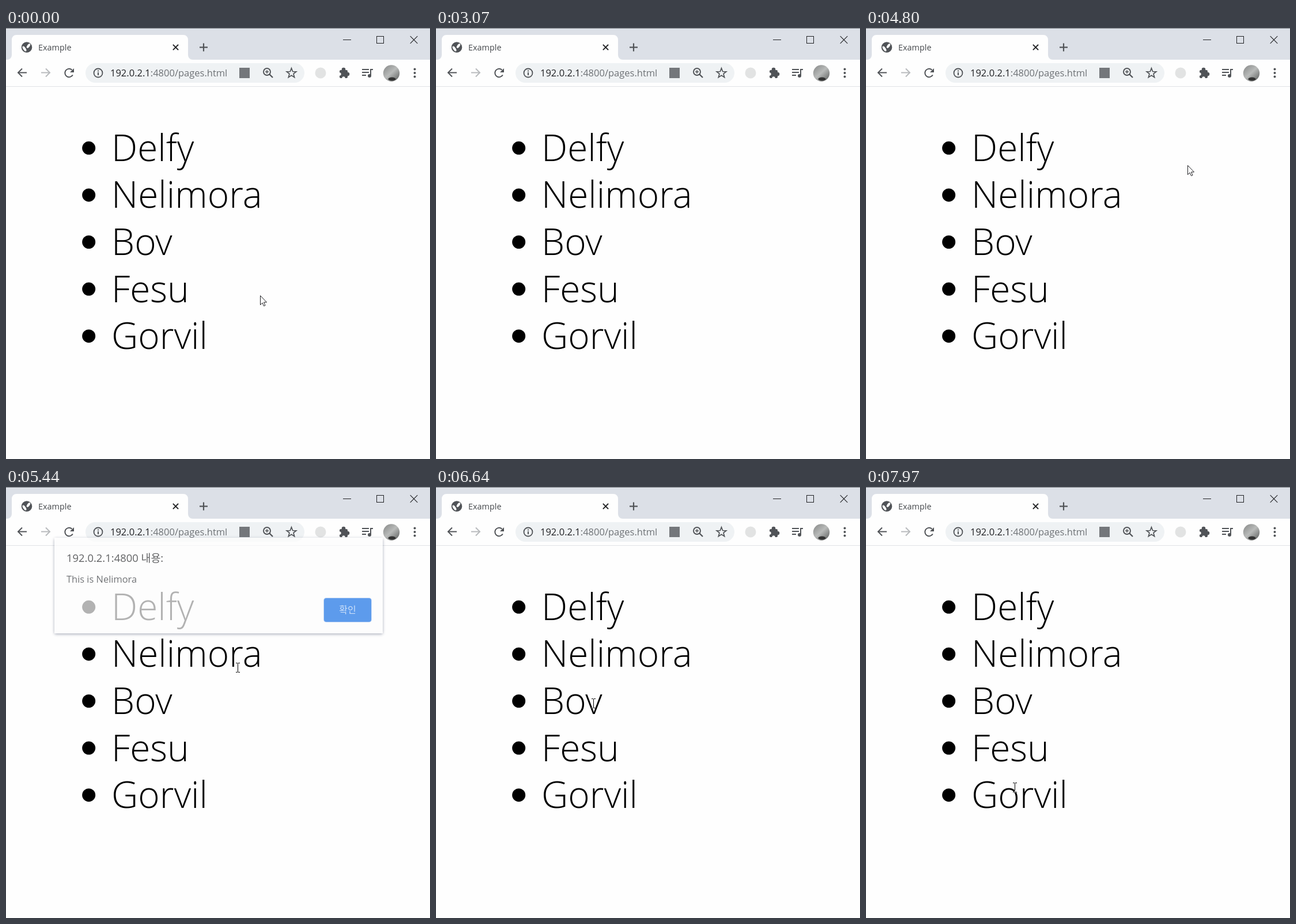
Write an HTML page with a canvas that moves like this. It is 736 by 748 pixels and loops after 8 s.

```html
<!DOCTYPE html>
<html lang="ko">
<head>
<meta charset="utf-8">
<title>Example</title>
<style>
html, body { margin: 0; width: 100%; height: 100%; overflow: hidden; background: #fefefe; }
canvas { display: block; }
</style>
</head>
<body>
<canvas id="stage" width="736" height="748"></canvas>
<script>
const ctx = document.getElementById('stage').getContext('2d');
const LOOP = 8000, FADE = 150, TAU = Math.PI * 2;
const FONT = '"Open Sans", "Noto Sans CJK KR", "Noto Sans CJK", "Noto Sans", sans-serif';
const PAGE = '#fefefe', STRIP = '#dce0e7', PILL = '#eff2f4', INK = '#505357', DARK = '#202124';
const NAMES = ['Delfy', 'Nelimora', 'Bov', 'Fesu', 'Gorvil'];
const HOST = '192.0.2.1', PORT = ':4800';
const LIST = { x: 183, base: 230.8, step: 81.6, font: `350 64px ${FONT}` };
const PANEL = { x: 84, y: 97, w: 570, h: 166 };

// Clicks on list items; each alert is closed with its button before the next click
const CLICKS = [
  { t: 3800, item: 0, x: 216, y: 220 },
  { t: 5335, item: 1, x: 402, y: 313 },
  { t: 6675, item: 2, x: 273, y: 375 },
  { t: 8000, item: 4, x: 258, y: 521 }
];
const BUTTON = { x: 592, y: 222 };
const START = { x: 441, y: 464 }, EXIT = { x: 425, y: 760 }, ENTRY = { x: 745, y: 330 };
// Fractions of the time between two clicks
const LEAVE = .18, REACH = .48, CLOSE = .52, RETURN = .56, ARRIVE = .9;

const clamp = v => Math.max(0, Math.min(1, v));

function move(a, b, t, from, to) {
  const v = clamp((t - from) / (to - from)), k = v * v * (3 - 2 * v);
  return { x: a.x + (b.x - a.x) * k, y: a.y + (b.y - a.y) * k };
}

function box(x, y, w, h, color, r = 0) {
  ctx.fillStyle = color;
  ctx.beginPath();
  ctx.roundRect(x, y, w, h, r);
  ctx.fill();
}

function oval(x, y, rx, ry, color, turn = 0) {
  ctx.fillStyle = color;
  ctx.beginPath();
  ctx.ellipse(x, y, rx, ry, turn, 0, TAU);
  ctx.fill();
}

const dot = (x, y, r, color = INK) => oval(x, y, r, r, color);

function ring(x, y, r, width = 2, from = 0, to = TAU) {
  ctx.strokeStyle = INK;
  ctx.lineWidth = width;
  ctx.beginPath();
  ctx.arc(x, y, r, from, to);
  ctx.stroke();
}

function trace(points, close) {
  ctx.beginPath();
  points.forEach(([x, y]) => ctx.lineTo(x, y));
  if (close) ctx.closePath();
}

function line(points, width = 2, color = INK, close = false) {
  ctx.strokeStyle = color;
  ctx.lineWidth = width;
  trace(points, close);
  ctx.stroke();
}

function shape(points, color = INK) {
  ctx.fillStyle = color;
  trace(points, true);
  ctx.fill();
}

function cross(x, y, r, width) {
  line([[x - r, y - r], [x + r, y + r]], width, DARK);
  line([[x + r, y - r], [x - r, y + r]], width, DARK);
}

function plus(x, y, r, width) {
  line([[x - r, y], [x + r, y]], width);
  line([[x, y - r], [x, y + r]], width);
}

function text(str, x, y, size, color, align = 'left') {
  ctx.font = `${size}px ${FONT}`;
  ctx.fillStyle = color;
  ctx.textAlign = align;
  ctx.fillText(str, x, y);
  return ctx.measureText(str).width;
}

function arrow(x, y, dir, color) {
  line([[x - 8 * dir, y], [x + 7 * dir, y]], 2, color);
  line([[x, y - 7], [x + 7 * dir, y], [x, y + 7]], 2, color);
}

function drawTab(left, right, top, bottom, r) {
  ctx.fillStyle = PAGE;
  ctx.beginPath();
  ctx.moveTo(left - r, bottom);
  ctx.arcTo(left, bottom, left, top, r);
  ctx.arcTo(left, top, right, top, r);
  ctx.arcTo(right, top, right, bottom, r);
  ctx.arcTo(right, bottom, right + r, bottom, r);
  ctx.lineTo(right + r, bottom);
  ctx.fill();
}

function drawTabStrip() {
  box(0, 0, 736, 55, STRIP);
  box(0, 0, 736, 1, '#7a7d82');
  drawTab(10, 316, 12, 55, 8);
  dot(36, 33.5, 9.3);
  oval(32, 36, 2.2, 5, PAGE, -.6);
  oval(39, 31, 2.2, 4.5, PAGE, .6);
  text('Example', 56, 38.8, 14.4, '#45484c');
  cross(294.5, 33.5, 4.6, 2);
  plus(343, 33.5, 7, 2.2);
  line([[585, 20.5], [599, 20.5]], 1, DARK);
  ctx.strokeRect(643.5, 14.5, 12, 12);
  cross(708, 20.5, 6.3, 1.1);
}

function drawStar(x, y) {
  const points = Array.from({ length: 10 }, (_, i) => {
    const r = i % 2 ? 3.7 : 8.8, a = i * TAU / 10 - TAU / 4;
    return [x + r * Math.cos(a), y + r * Math.sin(a)];
  });
  line(points, 1.7, INK, true);
}

function drawPuzzle(x, y) {
  box(x - 7, y - 5, 14, 14, INK, 2);
  dot(x, y - 6, 3.3);
  dot(x + 7, y + 2, 3.3);
  dot(x - 7, y + 2, 2.7, PAGE);
  dot(x, y + 9, 2.7, PAGE);
}

function drawQueue(x, y) {
  for (let i = 0; i < 3; i++) {
    line([[x, y + 5 * i], [x + (i < 2 ? 12 : 7), y + 5 * i]]);
  }
  line([[x + 19, y], [x + 15, y], [x + 15, y + 11]]);
  dot(x + 13, y + 11, 3);
}

function drawAvatar(x, y) {
  const g = ctx.createLinearGradient(x - 12, y - 12, x + 10, y + 12);
  g.addColorStop(0, '#8d8f8e');
  g.addColorStop(.5, '#b9bbba');
  g.addColorStop(1, '#6d6f6e');
  dot(x, y, 14.2, g);
  oval(x + 1, y + 10, 6.5, 3, '#333');
}

function drawToolbar() {
  box(0, 55, 736, 46, PAGE);
  box(0, 101, 736, 1, '#e1e3e6');
  arrow(28, 77.5, -1, INK);
  arrow(69, 77.5, 1, '#b8babd');
  ring(109.5, 78, 7.2, 2, .5, TAU * .875);
  shape([[118, 70], [118, 77], [111, 77]]);

  box(138, 61, 380, 34, PILL, 17);
  ring(160, 78, 7.5, 1.8);
  box(159, 77, 2, 5, INK);
  box(159, 73.5, 2, 2, INK);
  const w = text(HOST, 181, 84, 16.5, DARK);
  text(PORT + '/pages.html', 181 + w, 84, 16.5, '#6d7175');

  box(405, 69, 18, 18, '#74777b');
  ring(453, 76, 6, 1.9);
  plus(453, 76, 3, 1.5);
  line([[457.5, 80.5], [463, 86]], 2.3);
  drawStar(495.5, 78.5);
  dot(546, 78, 9.5, '#e2e3e3');
  drawPuzzle(586, 78);
  drawQueue(618, 72);
  drawAvatar(669, 78.5);
  for (let i = -1; i < 2; i++) dot(709.5, 78 + 6.5 * i, 2);
}

function drawList() {
  NAMES.forEach((name, i) => {
    dot(143.7, 208.3 + i * LIST.step, 11.5, '#000');
    ctx.font = LIST.font;
    ctx.textAlign = 'left';
    ctx.fillText(name, LIST.x, LIST.base + i * LIST.step);
  });
}

function sceneAt(t) {
  const i = CLICKS.findLastIndex(c => c.t <= t);
  if (i < 0) {
    const pointer = t < 1500
      ? move(START, EXIT, t, 120, 720)
      : move(ENTRY, CLICKS[0], t, 3180, 3720);
    return { pointer, show: 0 };
  }
  const click = CLICKS[i], next = CLICKS[i + 1];
  const gap = next.t - click.t, u = (t - click.t) / gap;
  const pointer = u < RETURN
    ? move(click, BUTTON, u, LEAVE, REACH)
    : move(BUTTON, next, u, RETURN, ARRIVE);
  const show = Math.min(clamp(u * gap / FADE), 1 - clamp((u - CLOSE) * gap / FADE));
  return { pointer, show, item: click.item };
}

function drawPanelShadow({ x, y, w, h }) {
  ctx.save();
  ctx.beginPath();
  ctx.rect(0, -50, 736, 848);
  ctx.rect(x, y, w, h);
  ctx.clip('evenodd');
  ctx.shadowColor = 'rgba(50, 60, 90, .6)';
  ctx.shadowBlur = 5;
  ctx.shadowOffsetY = 1.5;
  box(x, y, w, h, '#d5d9e2', 3);
  ctx.restore();
}

function drawAlert(item, show) {
  ctx.save();
  ctx.globalAlpha = show;
  ctx.translate(0, -30 * (1 - show));
  drawPanelShadow(PANEL);
  box(PANEL.x, PANEL.y, PANEL.w, PANEL.h, PAGE, 3);
  text(`${HOST}${PORT} 내용:`, 105, 139, 18.4, DARK);
  text('This is ' + NAMES[item], 105, 175.3, 16.4, '#36393d');
  box(551, 201, 84, 43, '#b5cff5', 5);
  box(552, 202, 82, 41, '#3080e8', 4);
  text('확인', 593, 227.5, 16, '#fff', 'center');
  ctx.restore();
}

function overPanel(x, y) {
  return x > PANEL.x && x < PANEL.x + PANEL.w && y > PANEL.y && y < PANEL.y + PANEL.h;
}

function overText(x, y) {
  const name = NAMES[Math.floor((y - 167) / LIST.step)];
  if (!name) return false;
  ctx.font = LIST.font;
  return x > LIST.x && x < LIST.x + ctx.measureText(name).width;
}

function drawPointer({ x, y }, show) {
  const beam = overText(x, y) && !(show && overPanel(x, y));
  ctx.save();
  ctx.translate(Math.round(x), Math.round(y));
  if (beam) {
    ctx.globalCompositeOperation = 'difference';
    box(0, -7, 1, 15, '#fff');
    for (const side of [-3, 1]) {
      box(side, -8, 3, 1, '#fff');
      box(side, 8, 3, 1, '#fff');
    }
  } else {
    const outline = [[.5, .5], [.5, 16.5], [4, 13], [6.5, 18.5], [9, 17.5], [6.5, 12], [11.5, 12]];
    shape(outline, '#fff');
    line(outline, 1, DARK, true);
  }
  ctx.restore();
}

function draw(t) {
  const { pointer, show, item } = sceneAt(t);
  box(0, 0, 736, 748, PAGE);
  drawTabStrip();
  drawToolbar();
  drawList();
  if (show > 0) drawAlert(item, show);
  drawPointer(pointer, show);
}

let start;
function tick(now) {
  start ??= now;
  draw((now - start) % LOOP);
  requestAnimationFrame(tick);
}
requestAnimationFrame(tick);
</script>
</body>
</html>
```
